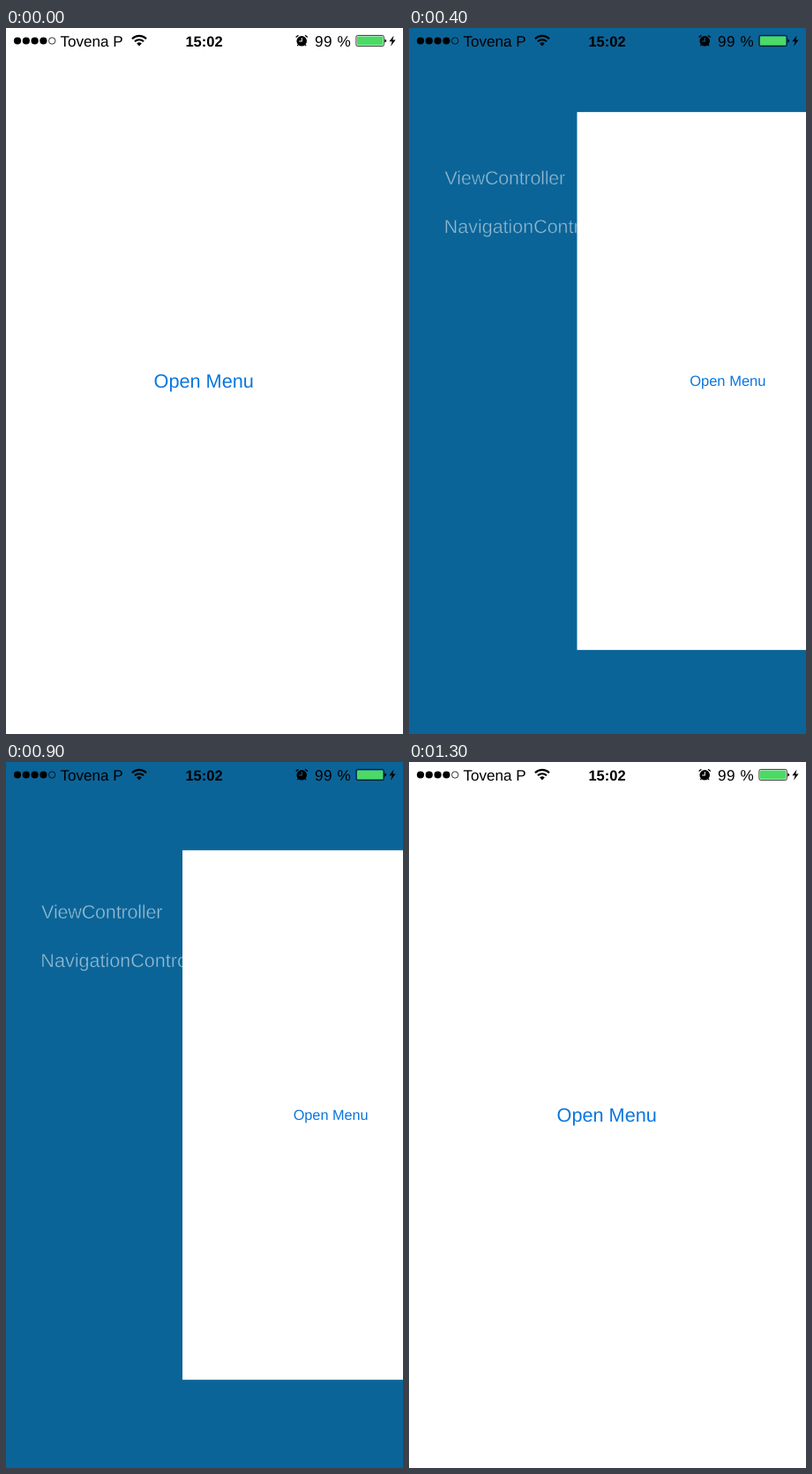
Recreate the animation shown at these times as an HTML page. Size 450 by 799 pixels, loop 1400 ms.

```html
<!DOCTYPE html>
<html lang="en">
<head>
<meta charset="utf-8">
<title>Side menu</title>
<style>
  html, body { margin: 0; width: 100%; height: 100%; overflow: hidden; background: #0b6498; }
  svg { display: block; width: 100%; height: 100%; }
  text { font-family: "Liberation Sans", Arial, sans-serif; text-rendering: geometricPrecision; }
  /* A background-coloured outline thins the letters to a light weight. */
  #menu text { font-size: 23px; fill: #fff; stroke: #0b6498; stroke-width: .45; }
  .status text { font-size: 17.1px; }
  .line { fill: none; stroke: #000; }
</style>
</head>
<body>
<svg viewBox="0 0 450 799">
  <rect width="450" height="799" fill="#0b6498"/>
  <g id="menu">
    <text y="8" letter-spacing="-.2">ViewController</text>
    <text x="-.8" y="67">NavigationController</text>
  </g>
  <g id="panel">
    <rect width="450" height="799" fill="#fff"/>
    <text x="224.2" y="407.3" font-size="21.7" text-anchor="middle" fill="#0a76e0">Open Menu</text>
  </g>
  <g class="status">
    <circle cx="13" cy="14.5" r="4.1"/>
    <circle cx="22.8" cy="14.5" r="4.1"/>
    <circle cx="32.6" cy="14.5" r="4.1"/>
    <circle cx="42.4" cy="14.5" r="4.1"/>
    <circle class="line" cx="52.2" cy="14.5" r="3.7" stroke-width=".8"/>
    <text x="61.5" y="20.5">Tovena P</text>
    <g class="line" stroke-width="2.1">
      <path d="M143 12.2a11.3 11.3 0 0 1 16 0"/>
      <path d="M146 15.3a7.1 7.1 0 0 1 10 0"/>
    </g>
    <path d="M151 20.4l-2.8-2.9a4 4 0 0 1 5.6 0z"/>
    <text x="224.5" y="20.5" text-anchor="middle" font-weight="bold" style="font-size:16.5px">15:02</text>
    <path fill-rule="evenodd" d="M329.4 14.8a5.8 5.8 0 1 0 11.6 0a5.8 5.8 0 1 0-11.6 0zM334.8 11h1v4.4h-3.6v-1h2.6z"/>
    <path class="line" stroke-width="1.3" d="M328.6 10.6l2.8-2.4M339 8.2l2.8 2.4M331.3 19l-1 1.2M339.1 19l1 1.2"/>
    <text x="350" y="20.5" letter-spacing=".6">99 %</text>
    <rect class="line" x="396.9" y="8.4" width="31.4" height="12.2" rx="1.8" stroke-width=".8"/>
    <rect x="398" y="9.5" width="29.2" height="10" rx=".8" fill="#4cd964"/>
    <path d="M429.3 12.4q1.8.4 1.8 2.1t-1.8 2.1z"/>
    <path d="M439.6 8.4l-5.2 6.8h3.2l-1.6 5.5 5.6-7.2h-3.3z"/>
  </g>
</svg>
<script>
  const STEP = 100, LOOP = 1400, FULL_SHIFT = 349;
  // Panel offset at each step: ease out to the right, rest, ease back.
  const opening = [0, 20, 62, 120, 190.5, 261.5, 325.7];
  const closing = [264, 200, 134, 72, 22, 0];
  const shifts = [...opening, opening.at(-1), ...closing];

  const menu = document.getElementById('menu');
  const panel = document.getElementById('panel');

  const place = (node, x, y, scale) =>
    node.setAttribute('transform', `translate(${x} ${y}) scale(${scale})`);

  function render(time) {
    const shift = shifts[Math.floor((time % LOOP) / STEP)];
    const shrink = shift * 0.00125;
    place(panel, shift, 399.5 * shrink, 1 - shrink);
    place(menu, 51 - shift * 0.0545, 188 - shift * 0.0947, 0.837 + shift * 0.0005);
    menu.setAttribute('opacity', shift / FULL_SHIFT);
  }

  const start = performance.now();
  function tick() {
    render(performance.now() - start);
    requestAnimationFrame(tick);
  }
  tick();
</script>
</body>
</html>
```
